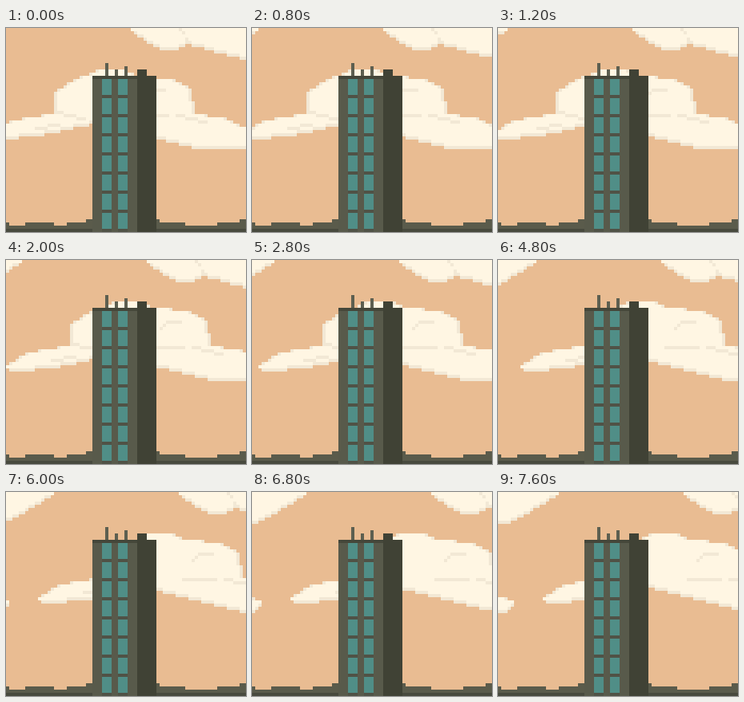
Animation, 300 px wide and 256 px high, one loop 8000 ms. Source, as an HTML page with a canvas:

```html
<!DOCTYPE html>
<html lang="en">
<head>
<meta charset="utf-8">
<title>Tower and drifting clouds</title>
<style>
html, body { margin: 0; width: 100%; height: 100%; overflow: hidden; background: #e9bc92; }
canvas { display: block; width: 300px; height: 256px; image-rendering: pixelated; }
</style>
</head>
<body>
<canvas id="stage" width="300" height="256"></canvas>
<script>
const ctx = document.getElementById('stage').getContext('2d');
const CELL = 4, COLS = 75, ROWS = 64, STEP = 400, LOOP = 8000;
const SKY = '#e9bc92', CLOUD = '#fff6e3', SHADE = '#f2e8d5';

// Upper and lower edges as a few key points, joined by straight lines and snapped to cells.
const clouds = [
  { top: [[-19, 33], [-17, 33], [-15, 34]],
    bottom: [[-19, 38], [-17, 38], [-15, 36]] },
  { top: [[-19, 0], [-1, 0]],
    bottom: [[-19, 10], [-16, 10], [-9, 6], [-1, 1]] },
  { top: [[39, 0], [74, 0]],
    bottom: [[39, 1], [43, 4], [48, 7], [52, 7], [56, 5], [74, 10]] },
  { top: [[-5, 33], [1, 29], [14, 27], [15, 20], [21, 16], [29, 13], [37, 13],
      [41, 15], [52, 16], [57, 19], [58, 23], [59, 27], [67, 28], [74, 31]],
    bottom: [[-5, 34], [-3, 35], [9, 34], [28, 30], [47, 35], [60, 38], [74, 38]] }
];

// Soft creases inside the clouds.
const creases = [
  [[54, 0], [57, 4]],
  [[43, 21], [45, 19], [49, 19]],
  [[40, 27], [50, 27]],
  [[53, 27], [62, 29]],
  [[15, 26], [24, 28]],
  [[9, 31], [16, 30]]
];

function rect(color, x, y, w, h) {
  ctx.fillStyle = color;
  ctx.fillRect(x * CELL, y * CELL, w * CELL, h * CELL);
}

function rowAt(points, x) {
  const i = points.findIndex(p => p[0] >= x);
  if (i < 0) return points[points.length - 1][1];
  if (i === 0) return points[0][1];
  const [x0, y0] = points[i - 1], [x1, y1] = points[i];
  return Math.round(y0 + (y1 - y0) * (x - x0) / (x1 - x0));
}

const span = points => [points[0][0], points[points.length - 1][0]];

function drawCloud({ top, bottom }, shift) {
  const [from, to] = span(top);
  for (let x = from; x <= to; x++) {
    const y = rowAt(top, x), end = rowAt(bottom, x);
    const side = Math.max(rowAt(top, x - 1), rowAt(top, x + 1));
    rect(CLOUD, x + shift, y, 1, end - y);
    if (side > y) rect(SHADE, x + shift, y, 1, Math.min(side, end) - y);
    if (end - y > 1) rect(SHADE, x + shift, end - 1, 1, 1);
  }
}

function drawCrease(points, shift) {
  const [from, to] = span(points);
  for (let x = from; x <= to; x++) rect(SHADE, x + shift, rowAt(points, x), 1, 1);
}

function drawGround() {
  rect('#5a5b4b', 0, 62, COLS, 2);
  for (const [x, w] of [[0, 1], [6, 9], [19, 37], [66, 9]]) rect('#5a5b4b', x, 61, w, 1);
  for (const [x, w] of [[25, 23], [73, 2]]) rect('#5a5b4b', x, 60, w, 1);
  rect('#484a3e', 0, 63, COLS, 1);
}

function drawTower() {
  for (const [x, h] of [[31, 4], [34, 2], [37, 3]]) rect('#5d5f50', x, 15 - h, 1, h);
  rect('#404235', 41, 13, 3, 2);
  rect('#585a4b', 27, 15, 14, 49);
  rect('#45473a', 27, 15, 14, 1);
  rect('#404235', 41, 15, 6, 49);
  for (const x of [30, 35]) {
    rect('#505246', x, 16, 3, 48);
    for (let y = 16; y < ROWS; y += 6) rect('#508e87', x, y, 3, 5);
  }
}

function draw(time) {
  const shift = Math.floor((time % LOOP) / STEP);
  rect(SKY, 0, 0, COLS, ROWS);
  for (const c of clouds) drawCloud(c, shift);
  for (const c of creases) drawCrease(c, shift);
  drawGround();
  drawTower();
}

const start = performance.now();
function tick() {
  draw(performance.now() - start);
  requestAnimationFrame(tick);
}
tick();
</script>
</body>
</html>
```
